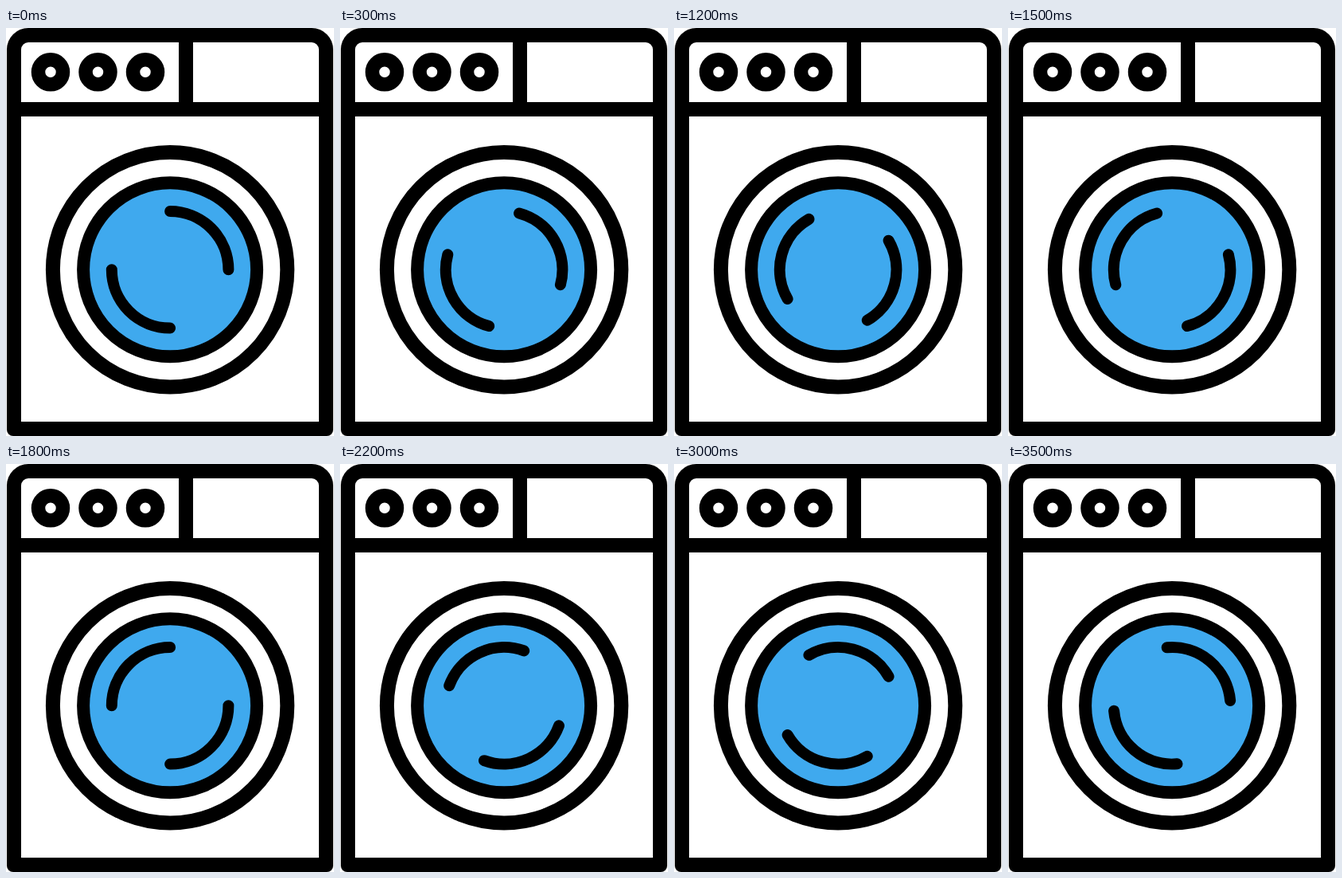
Recreate the animation shown at these times as an HTML page. Size 412 by 512 pixels, loop 3600 ms.

```html
<!DOCTYPE html>
<html lang="en">
<head>
<meta charset="utf-8">
<title>Washing machine</title>
<style>
  html, body { margin: 0; width: 100%; height: 100%; overflow: hidden; background: #fff; }
  svg { display: block; }
</style>
</head>
<body>
<svg width="412" height="512" viewBox="0 0 412 512">
  <!-- Cabinet -->
  <path d="M1 27A27 27 0 0 1 28 0H384A27 27 0 0 1 411 27V504A8 8 0 0 1 403 512H9A8 8 0 0 1 1 504Z"/>
  <g fill="#fff">
    <path d="M19 27A9 9 0 0 1 28 18H217V93H19Z"/>
    <path d="M235 18H384A9 9 0 0 1 393 27V93H235Z"/>
    <path d="M19 111H393V494H19Z"/>
  </g>
  <!-- Knobs -->
  <g fill="#fff" stroke="#000" stroke-width="17.5">
    <circle cx="56" cy="55.3" r="15.5"/>
    <circle cx="115.5" cy="55.3" r="15.5"/>
    <circle cx="175" cy="55.3" r="15.5"/>
  </g>
  <!-- Door -->
  <g transform="translate(206.1 303.3)" fill="none" stroke="#000">
    <circle r="147.2" stroke-width="18"/>
    <circle r="109" stroke-width="16" fill="#3fa9ee"/>
    <path id="drum" d="M0-73.3A73.3 73.3 0 0 1 73.3 0M0 73.3A73.3 73.3 0 0 1-73.3 0" stroke-width="14" stroke-linecap="round"/>
  </g>
</svg>
<script>
  const drum = document.getElementById('drum');
  const STEP_MS = 100, STEP_DEG = 5, STEPS = 36;

  function draw() {
    const step = Math.floor(performance.now() / STEP_MS) % STEPS;
    drum.setAttribute('transform', `rotate(${step * STEP_DEG})`);
    requestAnimationFrame(draw);
  }
  draw();
</script>
</body>
</html>
```
